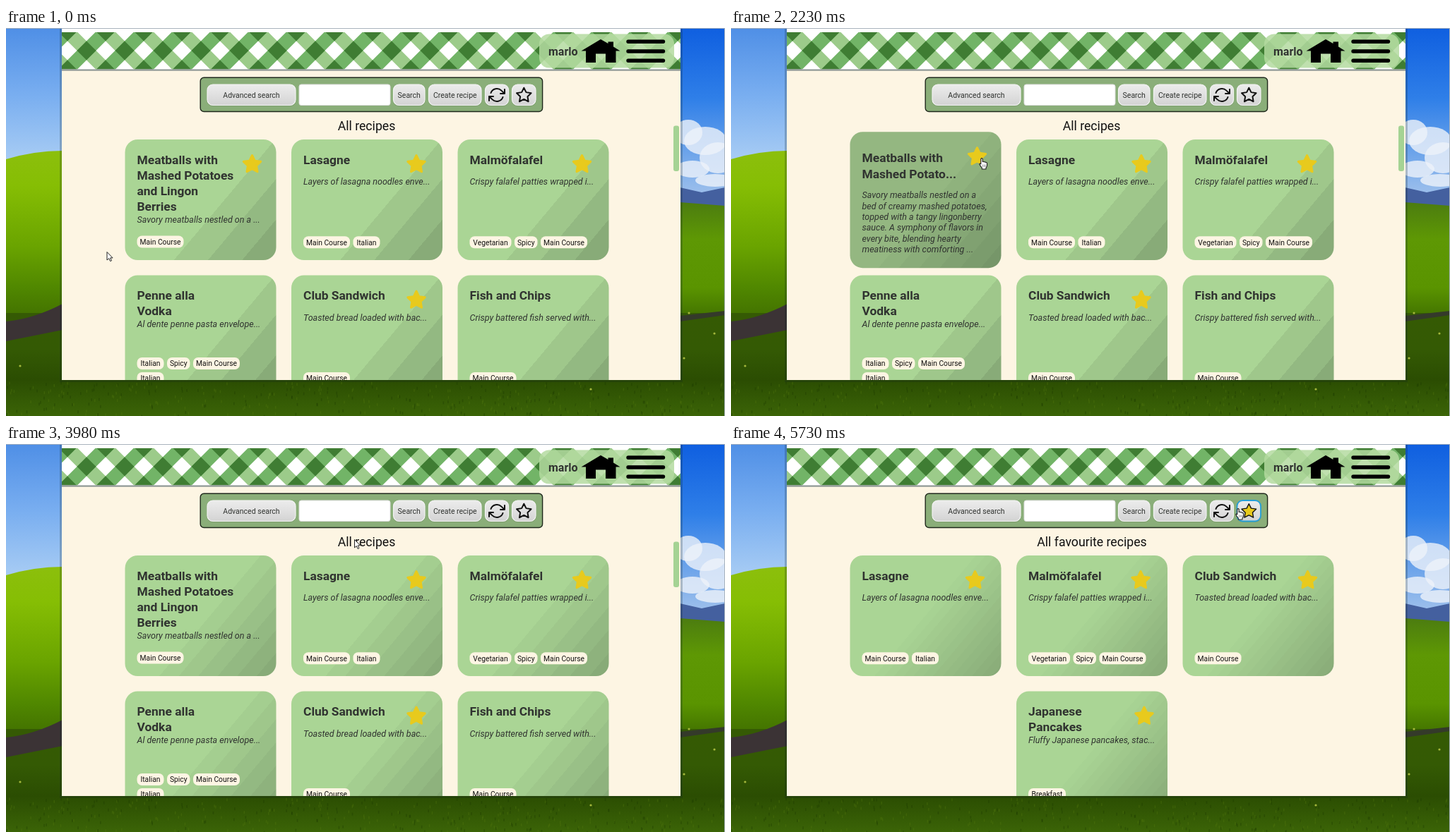
An HTML page for the animation above (8 s loop, 1018 px wide and 550 px high).

```html
<!DOCTYPE html>
<html lang="en">
<head>
<meta charset="utf-8">
<title>Recipes</title>
<style>
html, body { margin: 0; width: 100%; height: 100%; overflow: hidden; }
svg { display: block; width: 1018px; height: 550px; }
text { font-family: Roboto, "Open Sans", sans-serif; fill: #303330; }
.title { font-size: 17.4px; font-weight: 700; }
.desc { font-size: 12.5px; font-style: italic; }
.tag { font-size: 10.3px; fill: #111; text-anchor: middle; }
.btn { font-size: 10.5px; text-anchor: middle; }
.head { font-size: 17.7px; fill: #111; text-anchor: middle; }
.load { font-size: 26px; font-weight: 700; text-anchor: middle; }
.user { font-size: 16px; font-weight: 700; }
</style>
</head>
<body>
<svg viewBox="0 0 1018 550">
  <defs id="defs"></defs>
  <g id="wall"></g>
  <g fill="#122" opacity=".22">
    <rect x="76" y="0" width="882" height="502"/>
    <rect x="78" y="0" width="878" height="500"/>
  </g>
  <rect x="79" y="0" width="876" height="499" fill="#fdf5e3"/>
  <g id="page" clip-path="url(#win)"></g>
  <g id="chrome"></g>
  <g id="tools"></g>
  <path d="M0 .5H1018M1017.5 0V550" stroke="#a9b3bd"/>
  <g id="cursor"></g>
</svg>
<script>
const LOOP = 8000;
const $ = id => document.getElementById(id);
const rect = (x, y, w, h, r, fill, more = '') =>
  `<rect x="${x}" y="${y}" width="${w}" height="${h}" rx="${r}" fill="${fill}" ${more}/>`;
const text = (cls, x, y, s) => `<text class="${cls}" x="${x}" y="${y}">${s}</text>`;
const path = (d, fill, more = '') => `<path d="${d}" fill="${fill}" ${more}/>`;
const lines = (cls, x, y, gap, list) => list.map((s, i) => text(cls, x, y + i * gap, s)).join('');

const stops = list => list.map(([o, c]) => `<stop offset="${o}" stop-color="${c}"/>`).join('');
const vertical = (id, list) =>
  `<linearGradient id="${id}" x2="0" y2="1">${stops(list)}</linearGradient>`;

// Diagonal card shading made of n flat bands
function shade(id, h, from, to, n) {
  const list = [];
  for (let i = 0; i < n; i++) {
    const k = i / (n - 1);
    const c = `rgb(${from.map((v, j) => Math.round(v + (to[j] - v) * k))})`;
    const edge = j => j ? 0.46 + 0.54 * j / n : 0;
    list.push([edge(i), c], [edge(i + 1), c]);
  }
  const half = (214 * 0.766 + h * 0.643) / 2, dx = half * 0.766, dy = half * 0.643;
  return `<linearGradient id="${id}" gradientUnits="userSpaceOnUse" x1="${107 - dx}" y1="${h / 2 - dy}"
    x2="${107 + dx}" y2="${h / 2 + dy}">${stops(list)}</linearGradient>`;
}

function star(cx, cy, r, fill, stroke, width) {
  let d = '';
  for (let i = 0; i < 10; i++) {
    const a = i * Math.PI / 5, q = i % 2 ? r * 0.5 : r;
    d += `${i ? 'L' : 'M'}${(cx + q * Math.sin(a)).toFixed(2)} ${(cy - q * Math.cos(a)).toFixed(2)}`;
  }
  return path(d + 'Z', fill, `stroke="${stroke}" stroke-width="${width}" stroke-linejoin="round"`);
}
const GOLD = '#e8ca1d';
const goldStar = (x, y) => star(x, y, 12.8, GOLD, GOLD, 3);

const LIGHT = [170, 213, 149], DARK = [136, 171, 120];
$('defs').innerHTML =
  '<clipPath id="win"><rect x="79" y="60" width="876" height="439"/></clipPath>' +
  shade('card0', 171, LIGHT, DARK, 4) + shade('card1', 171, LIGHT, DARK, 7) +
  shade('card2', 171, LIGHT, DARK, 14) + shade('hover', 193, [148, 183, 129], [118, 150, 105], 7) +
  vertical('btn', [[0, '#ececec'], [0.5, '#e0e0e0'], [1, '#d3d3d3']]) +
  vertical('skyL', [[0, '#4f8fe6'], [0.5, '#79aef0'], [1, '#a9cdf4']]) +
  vertical('skyR', [[0, '#0f5fe0'], [0.4, '#2f7fe8'], [0.7, '#6ba3ea'], [1, '#a9c6ec']]) +
  vertical('hillL', [[0, '#8cbf0c'], [0.2, '#86be04'], [0.55, '#6aa400'], [0.8, '#4f8600'], [1, '#3f6c00']]) +
  vertical('hillR', [[0, '#4c7c10'], [0.3, '#5e9804'], [0.7, '#5a9400'], [1, '#3c6a00']]) +
  vertical('field', [[0, '#355a04'], [0.35, '#345a04'], [0.65, '#2b4d02'], [1, '#3b6407']]) +
  `<pattern id="cloth" width="54" height="54" viewBox="0 0 52 52" patternUnits="userSpaceOnUse" patternTransform="translate(114 32)">
    <rect width="52" height="52" fill="#fff"/>
    <g stroke-width="18.4">
      <path d="M-9-9L61 61M-9 43L9 61M43-9L61 9" stroke="#9ccb8a"/>
      <path d="M-9 9L9-9M-9 61L61-9M43 61L61 43" stroke="#72b467"/>
    </g>
    <path d="M26 13L39 26L26 39L13 26ZM0 0H13L0 13ZM52 0V13L39 0ZM0 52V39L13 52ZM52 52H39L52 39Z" fill="#3f7d33"/>
  </pattern>`;

// Wallpaper: soft hills and sky
function wallpaper() {
  let s = rect(0, 0, 80, 190, 0, 'url(#skyL)') + rect(954, 0, 64, 250, 0, 'url(#skyR)');
  s += '<g fill="#eef3fb">';
  for (const [x, y, rx, ry] of [[966, 148, 20, 18], [990, 160, 30, 20], [1008, 184, 26, 22], [972, 200, 24, 12], [1004, 216, 28, 9]])
    s += `<ellipse cx="${x}" cy="${y}" rx="${rx}" ry="${ry}" opacity=".8"/>`;
  s += '</g>' + path('M954 226L985 233L1018 226V255H954Z', '#44609f') +
    path('M0 186Q40 174 80 174V420H0Z', 'url(#hillL)') +
    path('M954 247L1018 252V420H954Z', 'url(#hillR)') +
    rect(0, 404, 1018, 146, 0, 'url(#field)') +
    path('M0 416Q40 412 80 391V428Q40 436 0 444Z', '#3b3335') +
    path('M954 408L1018 401V407L954 416Z', '#343a2a');
  // scattered blades
  let seed = 7;
  const rnd = () => (seed = seed * 16807 % 2147483647) / 2147483647;
  for (let i = 0; i < 420; i++) {
    const x = rnd() * 1018, y = 501 + rnd() * 49;
    s += rect(x.toFixed(1), y.toFixed(1), 1.5, 4, 0, i % 2 ? '#55790f' : '#1b3800', 'opacity=".35"');
  }
  for (const [x, y] of [[20, 479], [960, 468], [828, 512], [967, 404], [1003, 433]])
    s += `<circle cx="${x}" cy="${y}" r="1.6" fill="#a5b83c"/>`;
  return s;
}
$('wall').innerHTML = wallpaper();

const button = (x, w, label = '', edge = '#f4f4f4', line = 1.2) =>
  rect(x - 0.5, 80, w + 1, 31, 8, '#6c855f', 'opacity=".4"') +
  rect(x, 80, w, 29.5, 8, 'url(#btn)', `stroke="${edge}" stroke-width="${line}"`) +
  (label && text('btn', x + w / 2, 98.8, label));

$('chrome').innerHTML =
  rect(79, 0, 876, 59, 0, '#fff') + rect(79, 6, 876, 52.5, 0, 'url(#cloth)') +
  rect(79, 58.5, 876, 2.2, 0, '#8f9796') +
  rect(755, 8.5, 191, 48, 14, '#b4dba0', 'opacity=".85"') +
  text('user', 768, 38.5, 'marlo') +
  path('M842 16L852.500 22V19.500H860V26.500L869.500 32.500H863.500V49H849V36.500H835V49H821V32.500H814.500Z', '#000') +
  path('M881 19.300H930.500M881 33H930.500M881 46.300H930.500', 'none', 'stroke="#000" stroke-width="5.4" stroke-linecap="round"') +
  rect(275.2, 70.2, 484.4, 48.3, 5, '#8aae79', 'stroke="#1f281c" stroke-width="1.4"') +
  button(285, 125, 'Advanced search') +
  rect(415, 80, 129, 29.5, 3, '#fff', 'stroke="#dcdcdc"') +
  button(548.5, 44.5, 'Search') + button(598.5, 74.5, 'Create recipe') + button(678.5, 33) +
  `<g transform="translate(683 83)" fill="none" stroke="#111" stroke-width="2" stroke-linecap="round" stroke-linejoin="round">
    <path d="M23 4V10H17M1 20V14H7M3.510 9A9 9 0 0 1 18.360 5.640L23 10M1 14L5.640 18.360A9 9 0 0 0 20.490 15"/></g>`;

const TAG = { 'Main Course': 66, Italian: 38, Vegetarian: 59, Spicy: 32.5, Breakfast: 53 };
function tags(x, y, list) {
  return list.map(s => {
    const w = TAG[s], out = rect(x, y, w, 17, 7, '#fdf5e3') + text('tag', x + w / 2, y + 12.3, s);
    x += w + 4.5;
    return out;
  }).join('');
}

const COL = [168.5, 404, 639.5], ROW = [158, 350.5];
const MEAT = {
  title: ['Meatballs with', 'Mashed Potatoes', 'and Lingon', 'Berries'], desc: 'Savory meatballs nestled on a ...',
  tags: ['Main Course'], star: 180, brief: ['Meatballs with', 'Mashed Potato...'],
  more: ['Savory meatballs nestled on a', 'bed of creamy mashed potatoes,', 'topped with a tangy lingonberry',
    'sauce. A symphony of flavors in', 'every bite, blending hearty', 'meatiness with comforting ...']
};
const LASAGNE = {
  title: ['Lasagne'], desc: 'Layers of lasagna noodles enve...', tags: ['Main Course', 'Italian'], star: 177,
  more: ['Layers of lasagna noodles', 'enveloped in a rich meat sauce', 'and creamy cheese, baked until', 'golden and bubbling.']
};
const FALAFEL = { title: ['Malmöfalafel'], desc: 'Crispy falafel patties wrapped i...', tags: ['Vegetarian', 'Spicy', 'Main Course'], star: 176 };
const PENNE = { title: ['Penne alla', 'Vodka'], desc: 'Al dente penne pasta envelope...', tags: ['Italian', 'Spicy', 'Main Course'], extra: ['Italian'] };
const CLUB = { title: ['Club Sandwich'], desc: 'Toasted bread loaded with bac...', tags: ['Main Course'], star: 177 };
const FISH = { title: ['Fish and Chips'], desc: 'Crispy battered fish served with...', tags: ['Main Course'] };
const PANCAKE = { title: ['Japanese', 'Pancakes'], desc: 'Fluffy Japanese pancakes, stac...', tags: ['Breakfast'], star: 181 };

function card(c, col, row, tone, hover, starX = c.star) {
  const n = c.title.length;
  let s = `<g transform="translate(${COL[col]} ${ROW[row] - (hover ? 10.8 : 0)})">`;
  if (hover) {
    const brief = c.brief || c.title;
    s += rect(0, 0, 214, 193, 18, 'url(#hover)') + lines('title', 17, 43.3, 22.5, brief) +
      lines('desc', 17, 71.5 + 22.5 * (brief.length - 1), 15.4, c.more);
  } else {
    const tagY = row ? (c.extra ? 116.5 : 137.5) : n > 1 ? 136.5 : 137.3;
    s += rect(0, 0, 214, 171, 18, `url(#card${tone})`) + lines('title', 17, 34.5, 22.3, c.title) +
      text('desc', 17, n === 1 ? 64 : 29.5 + 22.2 * n, c.desc) + tags(17, tagY, c.tags) +
      (c.extra ? tags(17, tagY + 21, c.extra) : '');
  }
  return s + (starX ? goldStar(starX, 35.3) : '') + '</g>';
}

function allRecipes(t, hover) {
  const tone = t < 2910 ? 0 : 1;
  return text('head', 510.5, 144.5, 'All recipes') +
    card(MEAT, 0, 0, tone, hover === 1, t < 3060 ? 180 : 0) +
    card(LASAGNE, 1, 0, tone, hover === 2) + card(FALAFEL, 2, 0, tone) +
    card(PENNE, 0, 1, tone) + card(CLUB, 1, 1, tone) + card(FISH, 2, 1, tone) +
    rect(945, 138.5, 8, 64.5, 3, '#a5d394');
}

const favourites = () => text('head', 511, 144.5, 'All favourite recipes') +
  card(LASAGNE, 0, 0, 2) + card(FALAFEL, 1, 0, 2) + card(CLUB, 2, 0, 2) + card(PANCAKE, 1, 1, 2);

const loading = () => text('load', 517.5, 289, 'Loading') +
  '<circle cx="517.5" cy="330.8" r="30" fill="none" stroke="#48653f" stroke-width="8.6"/>' +
  path('M547.500 330.800A30 30 0 0 1 517.500 360.800', 'none', 'stroke="#96cb82" stroke-width="8.6"') +
  rect(79, 487.5, 876, 11.5, 0, '#e6e5e2');

const ARROW = path('M.5 .5V12L3.200 9.600L5.200 13.600L7 12.700L5.100 8.900H8.600Z', '#fff', 'stroke="#222" stroke-width="1"');
const HAND = path('M2.800 1.500Q4-.2 5.200 1.500V5.600Q6.500 4.600 7.500 6Q8.900 5.200 9.600 6.700Q11.500 6 11.500 8V11Q11.300 13 10 14.200V16H4.300V14.200Q2 11.700 .8 9Q.6 7.400 2.800 8.900Z',
  '#fff', 'stroke="#222" stroke-width="1.100" stroke-linejoin="round"') + path('M5.500 9.500V13M7.500 9.500V13M9.300 9.500V13', 'none', 'stroke="#555" stroke-width=".6"');

// [time, x, y, hand?, hovered card]
const STEPS = [
  [0, 142.5, 317, 0, 0], [1240, 164, 298, 0, 0], [1390, 246.5, 258, 1, 1], [1540, 283, 237, 1, 1],
  [1690, 312, 213, 1, 1], [1840, 326, 202, 1, 1], [1960, 336, 193, 1, 1], [2110, 347, 187, 1, 1],
  [2230, 351, 184, 1, 1], [2910, 351, 184, 1, 1], [3060, 351, 184, 1, 1], [3590, 356, 182, 1, 1],
  [3740, 406.5, 158, 1, 0], [3860, 444, 149, 1, 2], [3980, 493, 135, 0, 0], [4130, 552, 119, 0, 0],
  [4260, 610, 103, 1, 0], [4410, 685, 93, 1, 0], [4560, 714, 91, 1, 0], [5580, 714, 91, 1, 0], [5730, 714, 91, 1, 0]
];

let shown = -1;
function draw(t) {
  const i = STEPS.findLastIndex(s => s[0] <= t);
  if (i === shown) return;
  shown = i;
  const [at, x, y, hand, hover] = STEPS[i], fav = at >= 5580;
  $('page').innerHTML = at >= 5730 ? favourites() : fav ? loading() : allRecipes(at, hover);
  $('tools').innerHTML = button(716.5, 33.5, '', fav ? '#259fd8' : '#f4f4f4', fav ? 1.8 : 1.2) +
    star(733.3, 95.5, 10.8, fav ? GOLD : 'none', '#111', fav ? 1.4 : 2);
  $('cursor').innerHTML = `<g transform="translate(${x} ${y})">${hand ? HAND : ARROW}</g>`;
}

const start = performance.now();
function tick(now) {
  draw(Math.max(0, now - start) % LOOP);
  requestAnimationFrame(tick);
}
draw(0);
requestAnimationFrame(tick);
</script>
</body>
</html>
```
